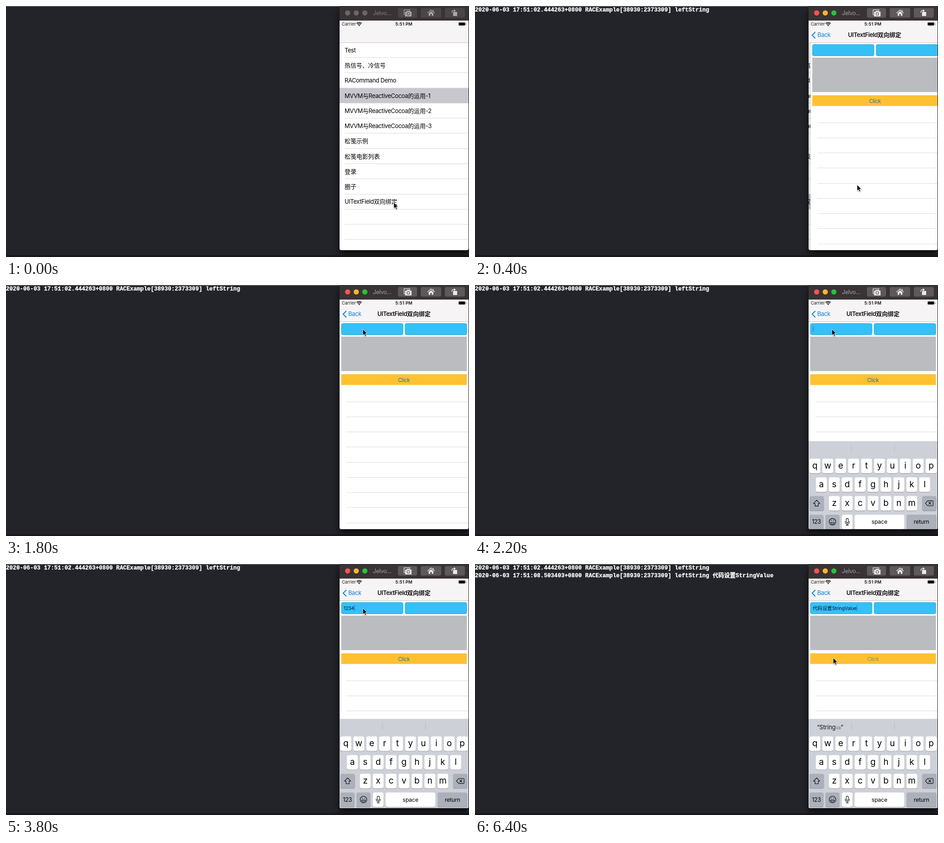
Animation of 1016x551 px, one loop 6600 ms. Source, as an HTML page:

```html
<!DOCTYPE html>
<html lang="zh-CN">
<head>
<meta charset="utf-8">
<title>Two-way binding demo</title>
<style>
html, body { margin: 0; width: 100%; height: 100%; overflow: hidden; background: #232429; }
svg { display: block; width: 1016px; height: 551px; }
text { font-family: Inter, 'Noto Sans CJK SC', 'Noto Sans CJK JP', 'Noto Sans CJK', sans-serif; white-space: pre; }
.mono {
  font-family: 'Liberation Mono', 'Noto Sans CJK SC', 'Noto Sans CJK JP', monospace;
  font-weight: 700; stroke: #fff; stroke-width: .3px;
}
</style>
</head>
<body>
<svg id="stage" viewBox="0 0 1016 551">
  <defs>
    <clipPath id="win"><path d="M732 0H1015V532a4 4 0 0 1-4 4H736a4 4 0 0 1-4-4Z"/></clipPath>
    <filter id="blur" x="-20%" y="-20%" width="140%" height="140%"><feGaussianBlur stdDeviation="8"/></filter>
    <filter id="soft" x="-50%" y="-50%" width="200%" height="200%"><feDropShadow dx="0" dy="1" stdDeviation="1" flood-opacity=".4"/></filter>
  </defs>
</svg>
<script>
const LOOP = 6600, STEP = 200;
const NS = 'http://www.w3.org/2000/svg';
const stage = document.getElementById('stage');

function add(parent, tag, attrs = {}) {
  const node = document.createElementNS(NS, tag);
  for (const k in attrs) node.setAttribute(k, attrs[k]);
  parent.appendChild(node);
  return node;
}
const group = (parent, attrs) => add(parent, 'g', attrs);
const rect = (parent, x, y, width, height, fill, more) =>
  add(parent, 'rect', { x, y, width, height, fill, ...more });
const path = (parent, d, fill, more) => add(parent, 'path', { d, fill, ...more });
const line = (parent, d, stroke, width = 1, more) =>
  path(parent, d, 'none', { stroke, 'stroke-width': width, ...more });

// Latin and CJK runs carry different tracking.
function setText(node, str, track = -.031, cjkTrack = 0) {
  if (node.dataset.str === str) return;
  node.dataset.str = str;
  node.textContent = '';
  for (const run of str.split(/([\u2E80-\uFFEF]+)/)) {
    if (!run) continue;
    const em = /[\u2E80-\uFFEF]/.test(run) ? cjkTrack : track;
    add(node, 'tspan', { style: `letter-spacing:${em}em` }).textContent = run;
  }
}
function label(parent, str, x, y, size, fill, more = {}, track, cjkTrack) {
  const node = add(parent, 'text', { x, y, 'font-size': size, fill, ...more });
  setText(node, str, track, cjkTrack);
  return node;
}
const MID = { 'text-anchor': 'middle' };
const show = (node, on) => node.setAttribute('opacity', +on);
const move = (node, x, y) => node.setAttribute('transform', `translate(${x} ${y})`);

// Console
rect(stage, 0, 0, 1016, 551, '#232429');
rect(stage, 0, 0, 1016, 1, '#8a8b8e');
rect(stage, 0, 547, 1016, 4, '#1c171c');
const logs = [
  '2020-06-03 17:51:02.444263+0800 RACExample[38930:2373309] leftString',
  '2020-06-03 17:51:08.503403+0800 RACExample[38930:2373309] leftString 代码设置StringValue'
].map((str, i) => label(stage, str, 0, 12 + 17 * i, 12.6, '#fff', { class: 'mono' }, 0));

// Simulator window
rect(stage, 732, 8, 283, 536, '#000', { opacity: .7, filter: 'url(#blur)' });
const win = group(stage, { 'clip-path': 'url(#win)' });
rect(win, 732, 0, 283, 536, '#fff');

// Menu page
const ROW = 33.27;
const menu = group(win);
const rowMark = rect(menu, 732, 0, 283, ROW, '#c8c7cd');
['Test', '热信号、冷信号', 'RACommand Demo', 'MVVM与ReactiveCocoa的运用-1',
  'MVVM与ReactiveCocoa的运用-2', 'MVVM与ReactiveCocoa的运用-3', '松笺示例', '松笺电影列表',
  '登录', '圈子', 'UITextField双向绑定', '', ''].forEach((str, i) => {
  const y = 80.3 + ROW * i;
  label(menu, str, 743, y + 21.4, 12.9, '#000');
  rect(menu, 743, Math.floor(y + ROW) - .3, 272, 1, '#d8d8da');
});
const dim = rect(win, 732, 80, 283, 456, '#000');

// Binding page
const page = group(win);
rect(page, 732, 80, 283, 456, '#fff');
for (const x of [736, 875.8])
  rect(page, x, 84.3, 135.3, 25.2, '#35c0f6', { rx: 3.5, stroke: '#2499c8', 'stroke-width': .7 });
rect(page, 735.7, 113.3, 275.6, 75.7, '#bbbcbf');
rect(page, 735.7, 196, 275.6, 23.5, '#ffc132');
const click = label(page, 'Click', 873.3, 212.5, 11.4, '#17749c', MID, -.015);
for (let i = 0; i < 9; i++) rect(page, 747, Math.floor(256 + ROW * i), 268, 1, '#dcdcde');
const input = label(page, '', 741, 100.7, 10.6, '#0b1a24');
const caret = rect(page, 741, 90.5, 1, 13, '#1c68b4');

// Status and navigation bars
rect(win, 732, 32, 283, 48, '#f6f4f5');
rect(win, 732, 80, 283, 1, '#c6c5c7');
label(win, 'Carrier', 737, 43.2, 9.2, '#111', {}, .01);
label(win, '5:51 PM', 873.3, 43.2, 9.4, '#111', { ...MID, 'font-weight': 600 }, .03);
for (const r of [8, 5])
  line(win, `M${775 - r * .7} ${44 - r * .7}A${r} ${r} 0 0 1 ${775 + r * .7} ${44 - r * .7}`, '#111', 1.8);
path(win, 'M775 44.3l-2-2a2.8 2.8 0 0 1 4 0Z', '#111');
rect(win, 992.6, 35.6, 15.8, 7.8, 'none', { rx: 2.2, stroke: '#999', 'stroke-width': .7 });
rect(win, 993.6, 36.6, 13.8, 5.8, '#000', { rx: 1.4 });
rect(win, 1009.2, 38.2, 1.2, 3, '#888', { rx: .6 });
const chevron = line(win, 'M746.8 57l-7 7 7 7', '#0b80e0', 2);
const back = label(win, 'Back', 751, 68.3, 12.9, '#0b80e0', {}, -.03);
const heading = label(win, 'UITextField双向绑定', 873.3, 68.3, 12.9, '#111', { ...MID, 'font-weight': 600 }, -.035);

// Title bar
rect(win, 732, 0, 283, 32, '#393335');
const lights = ['#fb5450', '#fdb42a', '#29c23a'].map((color, i) =>
  [add(win, 'circle', { cx: 749.7 + 18.9 * i, cy: 15.2, r: 5.7 }), color]);
const winTitle = label(win, 'Jelvo...', 805, 19.8, 12.8, '#a19d9f');
const buttons = [[860, 42], [910, 45], [963, 44]].map(([x, w]) => rect(win, x, 4.5, w, 21, '#5d5859', { rx: 3.5 }));
const icons = group(win, { fill: '#e9e8e8', stroke: '#e9e8e8', 'stroke-width': 1.2 });
line(icons, 'M875.5 18.8H873.5V8.3H886.5V10.5', '#e9e8e8', 1.2);
path(icons, 'M876 12.8h3l1.3-1.8h5.4l1.3 1.8h2.5v9.7h-13.5Z', '#e9e8e8', { 'stroke-width': .8 });
add(icons, 'circle', { cx: 882.8, cy: 17.3, r: 2.9, fill: 'none', stroke: '#5d5859' });
path(icons, 'M927.5 16l5.2-4.4 5.2 4.4v5.6h-3.6v-4h-3.2v4h-3.6Z', '#e9e8e8', { stroke: 'none' });
line(icons, 'M924.8 15.5l7.9-6.8 7.9 6.8M937.5 12V8.8', '#e9e8e8', 1.5);
rect(icons, 981, 13, 9, 9, '#e9e8e8', { stroke: 'none', rx: .8 });
line(icons, 'M978.5 15v-1.5a3.3 3.3 0 0 1 3.3-3.3h2', '#e9e8e8', 1.4);
path(icons, 'M983 7l4 3.2-4 3.2Z', '#e9e8e8', { stroke: 'none' });

// Keyboard
const board = group(win);
rect(board, 732, 340, 283, 200, '#cdd0d7');
for (const x of [825.5, 920]) rect(board, x, 347.5, 1, 17, '#b5b9c2');
const hint = label(board, '', 779.3, 363, 12.9, '#111', MID, -.02);
const partHint = label(board, '“String', 779.3, 363, 12.9, '#111', MID, -.01);
add(partHint, 'tspan', { 'font-size': 9.5, fill: '#666' }).textContent = 'Va';
add(partHint, 'tspan').textContent = '”';

function key(x, y, w, str = '', gray = false, size = 12.4) {
  rect(board, x, y - 14.7, w, 32, '#8b8e95', { rx: 3.8 });
  rect(board, x, y - 15.6, w, 32, gray ? '#abb0ba' : '#fff', { rx: 3.8 });
  label(board, str, x + w / 2, y + (size > 15 ? 6.2 : 4.6), size, '#000', MID, size > 15 ? 0 : -.02);
}
[['qwertyuiop', 733.8], ['asdfghjkl', 748], ['zxcvbnm', 776.4]].forEach(([row, x0], r) =>
  [...row].forEach((c, i) => key(x0 + 28.35 * i, 394 + 41 * r, 24, c, false, 19)));
key(734, 476, 31.5, '', true);
key(981, 476, 31.5, '', true);
key(734, 517, 30.5, '123', true);
key(769, 517, 31, '', true);
key(805, 517, 23.5);
key(833, 517, 109, 'space');
key(947, 517, 65.5, 'return', true);
const glyphs = group(board, { stroke: '#000', 'stroke-width': 1.1, fill: 'none', 'stroke-linejoin': 'round', 'stroke-linecap': 'round' });
const glyph = d => add(glyphs, 'path', { d });
glyph('M749.7 469.5l-7 7.3h3.6v5.7h6.8v-5.7h3.6Z');
glyph('M988.5 476.3l5-5.6h10.2a1.5 1.5 0 0 1 1.5 1.5v8.2a1.5 1.5 0 0 1-1.5 1.5h-10.2ZM995.5 473.6l5.2 5.2M1000.7 473.6l-5.2 5.2');
add(glyphs, 'circle', { cx: 784.5, cy: 517, r: 7.3 });
glyph('M780.2 518.4h8.6a4.3 3.6 0 0 1-8.6 0Z');
glyph('M782 513.6v1M787 513.6v1');
add(glyphs, 'rect', { x: 814.6, y: 509.5, width: 4.6, height: 9.5, rx: 2.3 });
glyph('M812.3 516v1.2a4.6 4.6 0 0 0 9.2 0V516M816.9 521.8v2.7M814.3 524.5h5.2');

// Pointer
const pointer = group(stage, { filter: 'url(#soft)' });
path(pointer, 'M0 0V13.6L3.1 10.7 5.2 15.4 7.5 14.4 5.4 9.8H9.6Z', '#000', { stroke: '#fff', 'stroke-width': .9 });

const trail = [[0, 851, 431], [200, 850, 432], [1000, 776, 178], [1200, 777, 159],
  [1800, 783, 97], [4400, 783, 97], [5400, 777, 195], [6100, 786, 206], [LOOP, 786, 206]];
function pointerAt(t) {
  const i = trail.findIndex(p => p[0] > t);
  const [a, b] = [trail[i - 1], trail[i]];
  const k = (t - a[0]) / (b[0] - a[0]), e = k * k * (3 - 2 * k);
  return [a[1] + (b[1] - a[1]) * e, a[2] + (b[2] - a[2]) * e];
}

// Remaining share of a critically damped move begun at `start`.
function spring(t, start) {
  const w = Math.max(0, t - start) * .01826;
  return (1 + w) * Math.exp(-w);
}
// Value of the last step reached in a [time, value] table.
const at = (steps, t) => steps.filter(s => s[0] <= t).pop()[1];

const typed = [[0, ''], [3800, '1234'], [4000, '12345'], [6200, '代码设置StringValue']];
const hints = [[0, ''], [4200, '“12345”'], [6400, '']];
const blink = [[0, 0], [2000, 1], [2400, .5], [2600, 0], [3000, .5], [3200, 1],
  [4600, 0], [5000, .5], [5200, 1], [5600, 0], [6000, .5], [6200, 1]];
const press = [[0, 1], [6200, .25], [6400, .6]];

function draw(t) {
  const active = t >= 200;
  const rest = spring(t, 65);

  show(logs[0], active);
  show(logs[1], t >= 6200);
  lights.forEach(([dot, color]) => dot.setAttribute('fill', active ? color : '#6b6668'));
  buttons.forEach(b => b.setAttribute('fill', active ? '#5d5859' : '#4a4547'));
  show(icons, active ? 1 : .6);
  show(winTitle, active ? 1 : .65);

  rowMark.setAttribute('y', 80 + ROW * (active ? 10 : 3));
  move(menu, -85 * (1 - rest), 0);
  show(dim, .125 * (1 - rest));
  move(page, 284 * rest, 0);
  show(chevron, 1 - rest);
  show(back, 1 - rest);
  show(heading, 1 - rest);
  move(back, 37 * rest, 0);
  move(heading, 226 * rest, 0);

  setText(input, at(typed, t));
  caret.setAttribute('x', 741.4 + (input.textContent ? input.getComputedTextLength() : 0));
  show(caret, at(blink, t));
  show(click, at(press, t));

  move(board, 0, 200 * spring(t, 1860));
  setText(hint, at(hints, t), -.02);
  show(partHint, t >= 6400);
  move(pointer, ...pointerAt(t));
}

const begin = performance.now();
function tick() {
  const t = (performance.now() - begin) % LOOP;
  draw(Math.floor(t / STEP) * STEP);
  requestAnimationFrame(tick);
}
tick();
</script>
</body>
</html>
```
